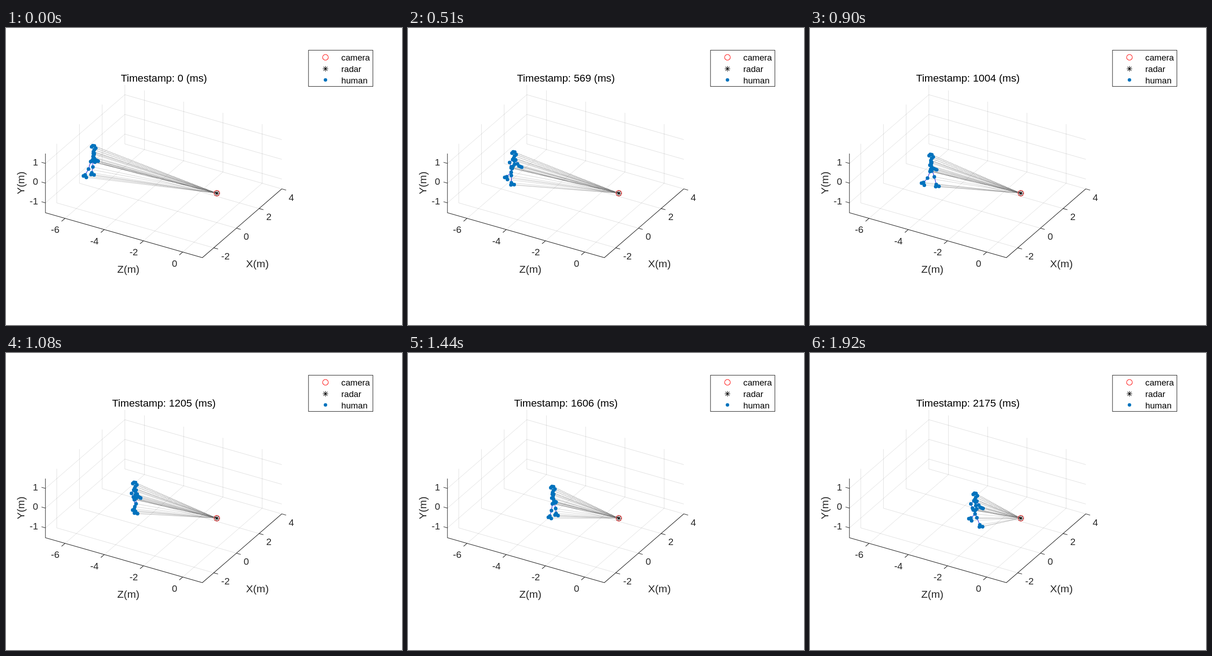
Recreate the animation shown at these times as an HTML page. Size 864x648 px, loop 1.95 s.

```html
<!DOCTYPE html>
<html lang="en">
<head>
<meta charset="utf-8">
<style>
html, body { margin: 0; width: 100%; height: 100%; overflow: hidden; background: #fff; }
svg { display: block; width: 864px; height: 648px; font-family: "Liberation Sans", Arial, sans-serif; }
path, rect, circle { fill: none; }
.grid { stroke: #262626; stroke-opacity: .15; }
.axis { stroke: #262626; stroke-width: 1.1; }
.ray { stroke: #000; stroke-opacity: .55; stroke-dasharray: 1 2; }
.bone { stroke: #1212dc; stroke-width: 1.1; }
.joint { stroke: #0072bd; stroke-width: 8; stroke-linecap: round; }
.camera { stroke: #f00; stroke-width: 1.1; }
.radar { stroke: #000; stroke-width: 1.1; }
.tick { font-size: 20.8px; fill: #262626; }
.label { font-size: 22.9px; fill: #262626; text-anchor: middle; }
.title { font-size: 22.7px; text-anchor: middle; }
.legend { font-size: 18.75px; }
</style>
</head>
<body>
<svg id="stage" viewBox="0 0 864 648"></svg>
<script>
const stage = document.getElementById('stage');

function add(tag, attrs, text) {
  const node = document.createElementNS('http://www.w3.org/2000/svg', tag);
  for (const name in attrs) node.setAttribute(name, attrs[name]);
  if (text !== undefined) node.textContent = text;
  return stage.appendChild(node);
}
const addPath = (cls, d = '') => add('path', { class: cls, d });
const addText = (cls, x, y, text, more) => add('text', { class: cls, x, y, ...more }, text);

// Orthographic view: metres to pixels.
const project = (x, y, z) => [
  459.9 + 24.75 * x + 42.8 * z,
  360 - 21.43 * x - 43 * y + 12.25 * z
];
const fmt = p => p.map(v => v.toFixed(2)).join(' ');
const polyline = points => 'M' + points.map(fmt).join('L');
const line3 = (...points) => polyline(points.map(p => project(...p)));
const tickMark = (p, dx, dy) => `M${fmt(p)}l${dx} ${dy}`;

const MIN = { x: -3, y: -1.5, z: -7 }, MAX = { x: 4, y: 1.5, z: 1 };

function drawAxes() {
  let grid = '';
  let axis = line3([MIN.x, MAX.y, MIN.z], [MIN.x, MIN.y, MIN.z], [MIN.x, MIN.y, MAX.z], [MAX.x, MIN.y, MAX.z]);
  [-6, -4, -2, 0].forEach((z, i) => {
    grid += line3([MIN.x, MIN.y, z], [MAX.x, MIN.y, z], [MAX.x, MAX.y, z]);
    axis += tickMark(project(MIN.x, MIN.y, z), -7.5, 6.5);
    addText('tick', 116.5 + 85.7 * i, 447 + 24.6 * i, z, { 'text-anchor': 'end' });
  });
  [-2, 0, 2, 4].forEach((x, i) => {
    grid += line3([x, MIN.y, MAX.z], [x, MIN.y, MIN.z], [x, MAX.y, MIN.z]);
    axis += tickMark(project(x, MIN.y, MAX.z), 9.5, 2.7);
    addText('tick', 469.5 + 49.1 * i, 505 - 42.8 * i, x);
  });
  [-1, 0, 1].forEach((y, i) => {
    grid += line3([MIN.x, y, MIN.z], [MAX.x, y, MIN.z], [MAX.x, y, MAX.z]);
    axis += tickMark(project(MIN.x, y, MIN.z), -8.5, -2.5);
    addText('tick', 70, 385 - 42.7 * i, y, { 'text-anchor': 'end' });
  });
  addPath('grid', grid);
  addPath('axis', axis);
  addText('label', 267, 534, 'Z(m)');
  addText('label', 548.5, 522, 'X(m)');
  addText('label', 0, 0, 'Y(m)', { transform: 'translate(39.5 338) rotate(-90)' });
}

const drawCamera = (cx, cy) => add('circle', { class: 'camera', cx, cy, r: 6.2 });
const drawRadar = (x, y) =>
  addPath('radar', `M${x - 6} ${y}h12M${x} ${y - 6}v12M${x - 4.3} ${y - 4.3}l8.6 8.6m0 -8.6l-8.6 8.6`);

function drawLegend() {
  add('rect', { class: 'axis', x: 660, y: 48.5, width: 140.5, height: 79 });
  drawCamera(697, 64);
  drawRadar(697, 89);
  addPath('joint', 'M697 113.3h0').style.strokeWidth = 7.5;
  ['camera', 'radar', 'human'].forEach((name, i) => addText('legend', 731.5, 71 + 25 * i, name));
}

drawAxes();
const rays = addPath('ray');
const bones = addPath('bone');
const joints = addPath('joint');
drawCamera(460, 360.5);
drawRadar(460, 360.5);
drawLegend();
const title = addText('title', 344.5, 117, '');

const SAMPLES = 65, STRIDE_PERIOD = 24.5;
const mix = (a, b, u) => a + (b - a) * u;
const ease = u => {
  u = Math.min(1, Math.max(0, u));
  return u * u * (3 - 2 * u);
};

// Walking figure at sample k, as chains of screen points.
function walker(k) {
  const phase = 2 * Math.PI * (k - 4) / STRIDE_PERIOD;
  const swing = -Math.cos(phase); // +1 when the left leg is ahead
  const armSwing = Math.sin(swing * Math.PI / 2);
  const crouch = ease((38 - k) / 24); // leans forward at first, then straightens up

  const rootZ = -6.4 + .0589 * k + 6.1e-5 * k * k - .077 * Math.sin(2 * Math.PI * k / SAMPLES);
  const rootY = -.23 - .035 * swing;
  const lower = (forward, up, side = 0) => project(side, rootY + up, rootZ + forward);
  const upper = (forward, up, side) => lower(forward + .13 * crouch, up - .035 * crouch, side);

  const pelvis = lower(0, 0);
  const neck = upper(-.02, .55);
  const chin = upper(.02, .66);
  const head = [upper(-.11, .77), upper(-.05, .85), upper(.03, .86), upper(.1, .76), chin];
  const trunk = [chin, neck, upper(.01, .41), upper(.02, .24), pelvis];

  function arm(side) {
    const s = side * armSwing;
    const joint = (forward, up, width) => upper(forward, up - .5 * width * side, width * side);
    const wrist = [.05 + .14 * s, .14 + .06 * s];
    const tip = [.14 + .19 * s, .09 + .09 * s];
    const hand = wrist.map((v, i) => mix(v, tip[i], .6));
    return [
      neck, joint(.03 * s, .47, .08), joint(.12 * s - .03, .28, .14),
      joint(...wrist, .1), joint(...hand, .1), joint(...tip, .1)
    ];
  }

  function leg(side) {
    const front = -side * swing;
    const flat = (1 + front) / 2;
    const lift = .08 * Math.max(0, -side * Math.sin(phase));
    const length = .6 + .1 * crouch - .03 * swing;
    const forward = (.3 - .11 * crouch) * front - .14 * crouch;
    const up = lift - length - .03 * front;
    const x = .125 * side;
    return [
      pelvis, lower(.02, .03, .085 * side),
      lower(.4 * forward + .03, -.49 * length, x),
      lower(forward, up, x),
      lower(forward + mix(-.105, -.023, flat), up - mix(.065, .112, flat), x),
      lower(forward + mix(.035, .14, flat), up - mix(.13, .054, flat), x)
    ];
  }

  return [head, trunk, arm(-1), arm(1), leg(-1), leg(1)];
}

function render(time) {
  const step = Math.floor(time % 1950 / 30);
  const k = step + (step >= 59 ? 1 : 0); // one sample is dropped
  const chains = walker(k);
  const points = chains.flat();
  title.textContent = `Timestamp: ${k && Math.round(33.445 * k + .6)} (ms)`;
  rays.setAttribute('d', points.map(p => `M460 360.5L${fmt(p)}`).join(''));
  bones.setAttribute('d', chains.map(polyline).join(''));
  joints.setAttribute('d', points.map(p => `M${fmt(p)}h0`).join(''));
}

const start = performance.now();
function loop() {
  render(performance.now() - start);
  requestAnimationFrame(loop);
}
loop();
</script>
</body>
</html>
```
